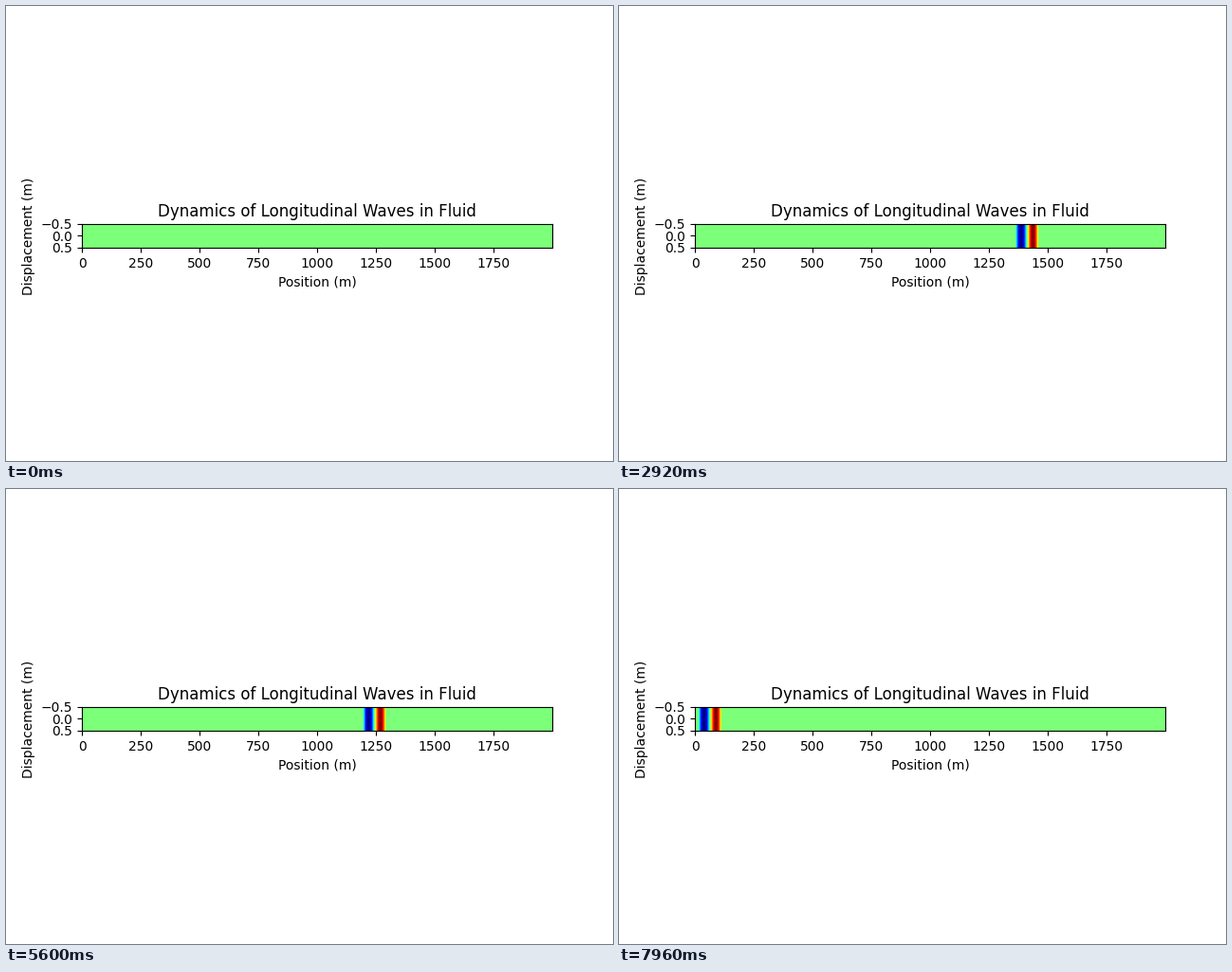
A matplotlib script that plays this animation: 640 by 480 pixels, repeating every 8000 ms.

```python
import matplotlib.pyplot as plt
import numpy as np
from matplotlib.animation import FuncAnimation

N = 2000        # grid points
WALL = 1998     # fixed end that reflects the pulse
START = 2       # lead of the wave front at time zero
SPEED = 20      # grid points per frame
WIDTH = 100     # pulse length
FRAMES = 200

x = np.arange(N)


def pulse(s):
    """One sine period, zero elsewhere."""
    return np.where((s > 0) & (s < WIDTH), np.sin(2 * np.pi * s / WIDTH), 0.0)


def displacement(n):
    front = START + SPEED * n
    u = pulse(front - x) - pulse(front - (2 * WALL - x))
    u[(x < 1) | (x >= WALL)] = 0
    return u[np.newaxis, :]


fig, ax = plt.subplots(figsize=(6.4, 4.8), dpi=100)
image = ax.imshow(displacement(0), cmap="jet", vmin=-1, vmax=1, aspect=100)
ax.set_title("Dynamics of Longitudinal Waves in Fluid")
ax.set_xlabel("Position (m)")
ax.set_ylabel("Displacement (m)")


def update(n):
    image.set_data(displacement(n))
    return [image]


anim = FuncAnimation(fig, update, frames=FRAMES, interval=40, repeat=True)
plt.show()
```
